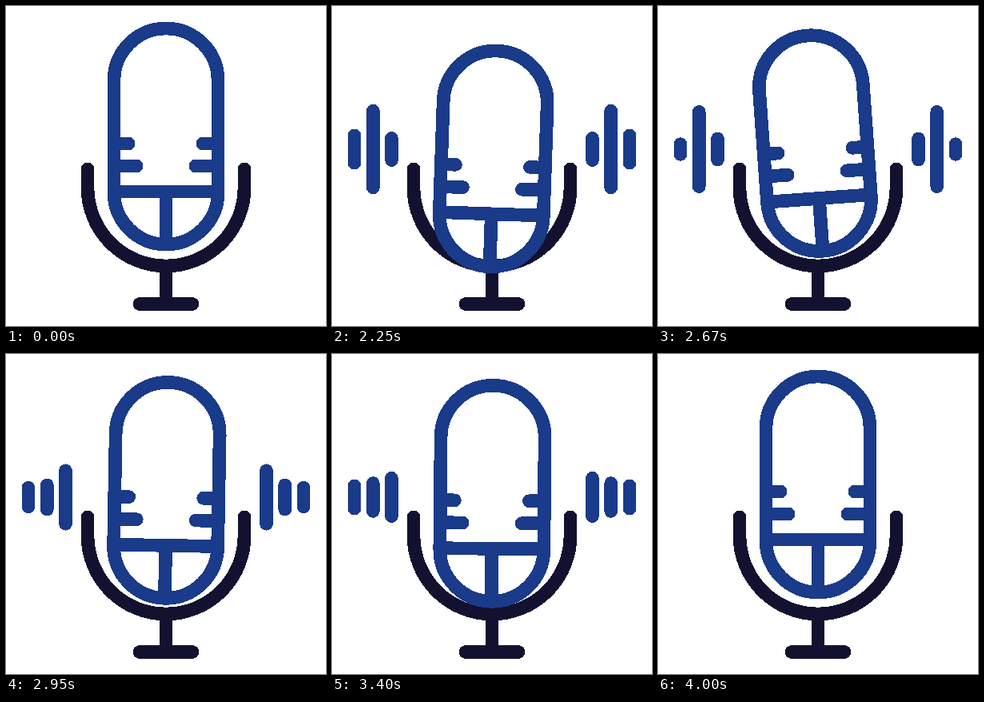
An HTML page that plays this animation: 400x400 px, repeating every 4020 ms.

```html
<!DOCTYPE html>
<html lang="en">
<head>
<meta charset="utf-8">
<title>Microphone</title>
<style>
  html, body { margin: 0; width: 100%; height: 100%; overflow: hidden; background: #fff; }
  svg {
    display: block; width: 100%; height: 100%; fill: none;
    stroke-width: 16.7; stroke-linecap: round; shape-rendering: crispEdges;
  }
</style>
</head>
<body>
<svg viewBox="0 0 400 400">
  <path stroke="#12112f" d="M102 204V227A98 98 0 0 0 298 227V204M200 325V372M167 372.5H233"/>
  <g stroke="#1a3a8a">
    <path id="mic" d="M135 93A65 65 0 0 1 265 93V233A65 65 0 0 1 135 233ZM135 232H265M200 232V298
      M135 172H153M135 200H163M265 172H246M265 200H237"/>
    <path id="bars"/>
  </g>
</svg>
<script>
const LOOP = 4020, SHOW = 2000, START = 1970, END = 4000, BAR_Y = 179;
const mic = document.getElementById('mic');
const bars = document.getElementById('bars');

// Turning points as [time, value]; every track rests at zero on both ends.
const track = (...turns) => [[START, 0], ...turns, [END, 0]];
const lift = track([2240, 28], [2550, -7], [2810, 28], [3070, -9], [3440, 12]);
const tilt = track([2110, -3], [2350, 5], [2690, -4.2], [3180, 5.4], [3520, -1.4]);

// A bar's half length swings between high and low at the given times.
const level = (x, low, high, times) =>
  ({ x, keys: track(...times.map((t, i) => [t, i % 2 ? low : high])) });
const levels = [
  level(172, 6.3, 17.2, [2240, 2690, 3200, 3760]),
  level(148.7, 15, 48, [2240, 2460, 2700, 2960, 3200, 3440, 3760]),
  level(125.5, 13, 33.3, [2160, 2260, 2470, 2680, 2940, 3195, 3590])
];

function sample(keys, t) {
  const i = keys.findIndex(([time]) => time > t);
  const [t0, a] = keys[i - 1], [t1, b] = keys[i];
  const u = (t - t0) / (t1 - t0);
  return a + (b - a) * u * u * (3 - 2 * u);
}

function draw(now) {
  const time = now % LOOP;
  const step = time % 50;
  const t = time - step + (step >= 20 ? 20 : 0); // alternate 20 and 30 ms steps
  const active = t > SHOW && t < END;
  const value = keys => active ? sample(keys, t) : 0;
  mic.setAttribute('transform', `translate(0 ${value(lift)}) rotate(${value(tilt)} 200 213)`);
  bars.setAttribute('d', active ? levels.map(({ x, keys }) => {
    const h = value(keys);
    return [200 - x, 200 + x].map(px => `M${px} ${BAR_Y - h}v${2 * h}`).join('');
  }).join('') : '');
}

const begin = performance.now();
function tick() {
  draw(performance.now() - begin);
  requestAnimationFrame(tick);
}
tick();
</script>
</body>
</html>
```
